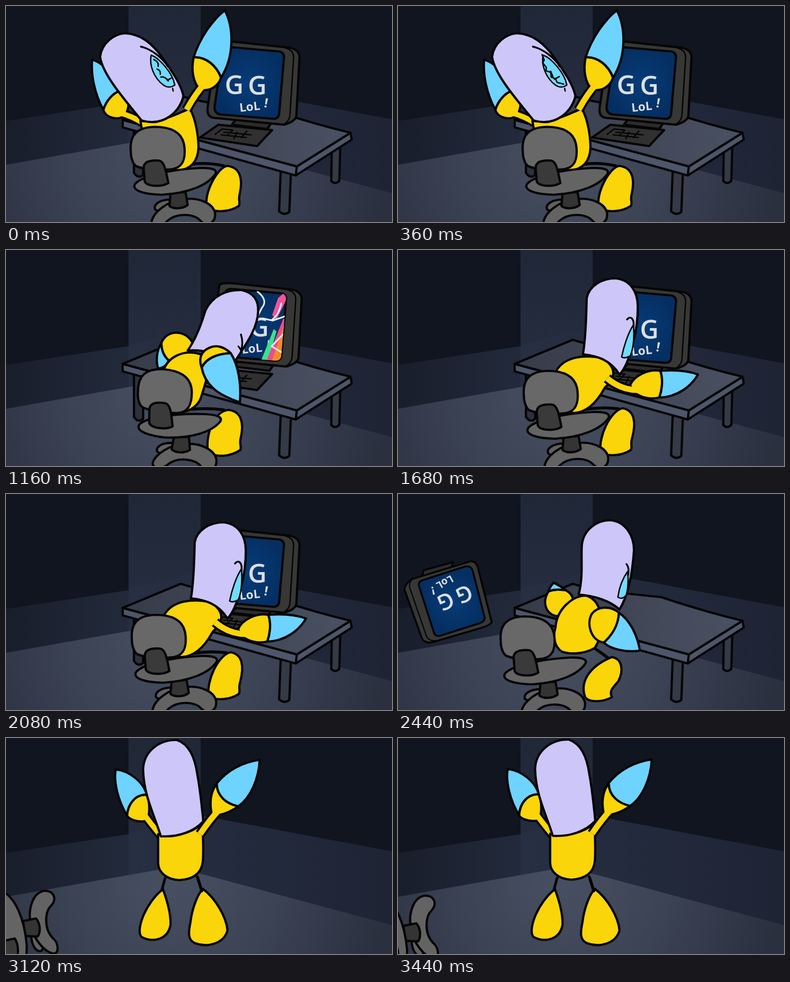
An HTML page for the animation above (3.48 s loop, 718 by 404 pixels).

```html
<!DOCTYPE html>
<html lang="en">
<head>
<meta charset="utf-8">
<title>Rage at the desk</title>
<style>
html, body { margin: 0; width: 100%; height: 100%; overflow: hidden; background: #11141d; }
svg { display: block; width: 100vw; height: 100vh; }
.ink { stroke: #050505; stroke-width: 4.2; stroke-linejoin: round; stroke-linecap: round; }
.line { fill: none; }
.thin { stroke-width: 2.6; }
text { fill: #dcdfe2; font-family: "Open Sans", sans-serif; }
</style>
</head>
<body>
<svg viewBox="0 0 718 404" preserveAspectRatio="none">
  <defs>
    <linearGradient id="pillar" x1="0" y1="0" x2="0" y2="1">
      <stop offset="0" stop-color="#202737"/><stop offset="1" stop-color="#273043"/>
    </linearGradient>
    <linearGradient id="wallL" x1="0" y1="0" x2="1" y2="0">
      <stop offset="0" stop-color="#191e2b"/><stop offset="1" stop-color="#252d3f"/>
    </linearGradient>
    <linearGradient id="wallR" x1="0" y1="0" x2="1" y2="0">
      <stop offset="0" stop-color="#272f43"/><stop offset="1" stop-color="#1e2434"/>
    </linearGradient>
    <radialGradient id="floor" gradientUnits="userSpaceOnUse" cx="310" cy="270" r="400">
      <stop offset="0" stop-color="#475062"/><stop offset=".5" stop-color="#3b4254"/><stop offset="1" stop-color="#2b303f"/>
    </radialGradient>
    <linearGradient id="top" x1="0" y1="0" x2="1" y2="0">
      <stop offset="0" stop-color="#363b49"/><stop offset="1" stop-color="#4a5162"/>
    </linearGradient>
    <radialGradient id="glow">
      <stop offset="0" stop-color="#063c78"/><stop offset="1" stop-color="#052f62"/>
    </radialGradient>
    <clipPath id="glass"><use href="#screen"/></clipPath>
  </defs>

  <rect width="718" height="404" fill="#11151f"/>
  <path d="M228 0H362V300H228Z" fill="url(#pillar)"/>
  <path d="M0 215L228 180L290 250L0 300Z" fill="url(#wallL)"/>
  <path d="M228 178L362 145L718 212V352L280 250L228 258Z" fill="url(#wallR)"/>
  <path d="M0 297L280 247L318 242L718 350V404H0Z" fill="url(#floor)"/>

  <g id="desk" class="ink">
    <path d="M238 230L238 312Q246 324 255 316L256 235Z" fill="#2d313b"/>
    <path d="M606 265L605 327Q612 335 620 327L622 255Z" fill="#343a46"/>
    <path d="M511 308L508 384Q518 393 527 385L530 312Z" fill="#343a46"/>
    <path d="M217 213L217 227L539 317L643 250L641 237L541 300Z" fill="#4d566a"/>
    <path d="M217 213L325 168Q350 176 385 182L490 193Q570 220 641 237L541 300Z" fill="url(#top)"/>
    <path class="line" d="M541 300L539 317"/>
  </g>

  <g id="keys" class="ink">
    <path d="M361 246L395 222L495 232L467 262Z" fill="#303030"/>
    <path class="line thin" d="M389 240L402 230L420 232M400 241L447 246M422 232L412 242M430 236L424 248M448 234L438 246M405 236L456 241"/>
  </g>

  <g id="monitor" class="ink">
    <path d="M428 212L420 222L486 230L492 221L482 214Z" fill="#2c2c2c"/>
    <path d="M393 69Q400 64 425 67L528 78Q546 82 546 96L540 206Q538 216 517 222L385 209Q373 206 375 190Z" fill="#373736"/>
    <path class="line thin" d="M518 78Q535 82 535 96L528 206Q526 216 517 221"/>
    <path id="screen" d="M403 86Q405 76 418 77L508 85Q518 87 517 97L508 202Q507 211 497 211L400 203Q387 201 388 188Z" fill="url(#glow)"/>
    <g stroke="none">
      <text x="407" y="165" font-size="48" font-weight="600">G</text>
      <text x="450" y="166" font-size="48" font-weight="600">G</text>
      <text transform="translate(435 198) rotate(-6)" font-size="22" font-weight="700">LoL</text>
      <text transform="translate(479 189) rotate(10)" font-size="24" font-weight="700">!</text>
    </g>
    <g id="crack" clip-path="url(#glass)" stroke="none">
      <path d="M491 126L502 94L520 78L516 100L499 134Z" fill="#f0559a"/>
      <path d="M470 212L494 152L499 156L484 212Z" fill="#3ee08c"/>
      <path d="M480 212L512 132L518 136L490 212Z" fill="#ee4b90"/>
      <path d="M490 212L518 130V212Z" fill="#f5892c"/>
      <path d="M464 82Q484 98 472 112L462 132M474 132L492 136L515 128M490 135Q504 126 508 104M511 162L490 184L513 198" fill="none" stroke="#e8eef5" stroke-width="3"/>
    </g>
  </g>

  <g id="upperBack">
    <path id="armLo" class="line" stroke="#050505" stroke-width="18"/>
    <path id="palmL" class="ink" fill="#fad50a"/>
    <path id="armLi" class="line" stroke="#fad50a" stroke-width="10"/>
    <path id="tipL" class="ink" fill="#6fd3ff"/>
  </g>
  <g id="legs" class="ink">
    <g id="leftLeg">
      <path class="line" stroke-width="5" d="M296 262Q292 276 288 292"/>
      <path d="M292 283C300 305 307 330 306 350C300 380 270 382 252 372C240 358 262 305 292 283Z" fill="#fad50a"/>
    </g>
    <path id="foot" fill="#fad50a"/>
    <path id="leg" class="line" style="stroke-width:5.5"/>
  </g>
  <g id="upper">
    <path id="body" class="ink" fill="#fad50a"/>
    <path id="head" class="ink" fill="#cdc7f9"/>
    <g id="face">
      <path id="eye" class="ink thin" fill="#6fdcff"/>
      <path id="brow" class="ink line" style="stroke-width:3.4"/>
      <g id="scowl" class="ink line thin">
        <path d="M310 154l1 5"/>
        <path id="wide" d="M275 100q10 5 8 13M281 118q7 2 6 10M288 133q7-2 14 7M300 139l7-4"/>
        <path id="jag" d="M268 91l4 10l-3 5l7 9l-1 6l9 3l1 9l8 3l3 7l12 3M284 122l4 10M291 137l9-5"/>
      </g>
    </g>
  </g>
  <g id="chair" class="ink">
    <path d="M306 362C288 362 274 370 277 380C283 386 300 382 312 378Z" fill="#606060"/>
    <path d="M271 402C275 385 300 366 325 362C360 356 386 370 389 388C390 408 372 412 362 402C350 388 318 386 300 402C292 412 270 414 271 402Z" fill="#636363"/>
    <path d="M306 350L334 348L338 372C328 380 312 380 304 374Z" fill="#343434"/>
    <path d="M240 333C250 320 300 306 360 303C386 302 394 307 389 315C375 335 340 350 290 353C250 352 234 343 240 333Z" fill="#646464"/>
    <path d="M232 270C230 240 245 227 276 226C312 226 330 240 332 265C334 288 328 302 310 305C285 308 255 306 241 299Q232 290 232 270Z" fill="#686868"/>
    <path d="M256 302C257 290 270 288 284 289C297 290 299 320 302 331C290 339 262 338 258 328Z" fill="#3a3a3a"/>
  </g>
  <g id="upperFront">
    <path id="armRo" class="line" stroke="#050505" stroke-width="19"/>
    <path id="palmR" class="ink" fill="#fad50a"/>
    <path id="armRi" class="line" stroke="#fad50a" stroke-width="11"/>
    <path id="tipR" class="ink" fill="#6fd3ff"/>
  </g>
</svg>
<script>
const LOOP = 3480;
const $ = id => document.getElementById(id);

// Five poses per part: arms raised, head slam, glare, grip, standing.
const parts = {
  head: [
    "M175 95C178 70 200 52 222 51C255 53 275 75 290 95C310 125 325 145 330 168C325 195 295 227 252 214C225 180 180 130 175 95Z",
    "M371 113C384 86 410 74 438 75C462 80 470 95 469 115C468 150 440 185 425 210C400 195 370 186 338 188C352 168 363 140 371 113Z",
    "M351 90C355 68 378 53 405 53C432 56 446 78 446 105C447 150 430 215 412 233C395 205 370 198 344 195C350 160 350 120 351 90Z",
    "M342 95C345 68 368 49 395 49C425 52 439 80 439 105C436 150 428 190 412 216C395 200 365 190 336 188C345 155 340 120 342 95Z",
    "M255 62C256 28 285 6 318 7C341 15 352 42 356 72C362 105 364 130 367 159C350 178 320 189 288 187C275 145 256 110 255 62Z"],
  body: [
    "M250 215C290 220 320 200 342 192C355 215 358 250 358 265C357 290 345 305 320 308C290 305 260 280 250 215Z",
    "M292 228C300 200 330 185 362 195C385 215 372 245 364 272C357 298 330 308 300 305C270 290 280 250 292 228Z",
    "M295 225C310 200 345 195 380 202C408 220 405 240 385 257C370 285 350 305 325 305C290 290 285 250 295 225Z",
    "M293 250C295 215 325 190 350 190C385 200 385 260 366 288C345 300 320 300 305 295C290 285 288 265 293 250Z",
    "M283 183C310 190 345 182 366 163C366 190 368 215 366 235C363 262 340 268 322 269C300 268 282 255 283 235Z"],
  palmL: [
    "M213 158C232 168 230 190 222 204C210 215 185 210 181 194C186 178 198 163 213 158Z",
    "M303 207C332 205 354 182 345 170C330 148 298 150 289 174C289 186 293 198 303 207Z",
    "M335 235C345 230 350 240 345 245C335 250 325 240 320 225C325 228 330 230 335 235Z",
    "M312 180C330 190 330 205 310 225C285 238 262 210 280 182C290 178 300 178 312 180Z",
    "M262 109C268 125 268 145 262 158C245 162 228 155 225 148C227 126 240 109 262 109Z"],
  tipL: [
    "M160 101C178 103 200 130 213 158C198 163 186 178 181 194C165 165 158 130 160 101Z",
    "M283 222C292 221 299 215 303 207C293 198 289 186 289 174C279 190 279 210 283 222Z",
    "M320 250C325 245 330 240 335 235C330 230 325 228 320 225C315 235 315 245 320 250Z",
    "M290 166C298 170 305 174 312 180C300 178 290 178 280 182C282 175 285 170 290 166Z",
    "M204 62C230 65 255 85 262 109C240 109 227 126 225 148C208 120 200 85 204 62Z"],
  armL: [
    "M212 200Q235 206 260 222", "M325 180Q325 181 325 182", "M335 240Q335 241 335 242",
    "M300 205Q300 206 300 207", "M256 145Q268 162 288 186"],
  palmR: [
    "M349 96C344 120 348 145 362 157C380 160 395 150 400 134C392 112 372 94 349 96Z",
    "M418 193C405 180 390 177 378 183C362 190 358 204 364 220C372 203 392 194 418 193Z",
    "M488 226C465 222 440 235 432 252C435 270 460 282 486 276C492 260 493 240 488 226Z",
    "M411 222C395 208 370 210 360 225C350 245 360 275 383 278C400 262 410 245 411 222Z",
    "M392 88C380 105 378 125 383 147C400 150 420 140 432 131C410 126 392 112 392 88Z"],
  tipR: [
    "M407 8C424 40 425 95 400 134C392 112 372 94 349 96C360 60 385 25 407 8Z",
    "M435 285C410 276 372 262 364 220C372 203 392 194 418 193C432 215 438 250 435 285Z",
    "M558 233C545 255 520 275 486 276C492 260 493 240 488 226C515 224 540 226 558 233Z",
    "M450 293C425 297 395 290 383 278C400 262 410 245 411 222C430 235 445 262 450 293Z",
    "M472 44C470 80 455 115 432 131C410 126 392 112 392 88C415 60 445 48 472 44Z"],
  armR: [
    "M369 146Q353 163 336 194", "M382 188Q382 189 382 190", "M446 262Q415 262 389 240",
    "M380 240Q380 241 380 242", "M396 138Q380 155 361 183"],
  eye: [
    "M270 92C285 97 310 125 314 148C308 152 300 153 293 148C275 135 266 110 270 92Z",
    "M432 180C434 183 436 186 438 189C438 188 437 187 437 186C436 184 434 182 432 180Z",
    "M438 140C440 160 438 185 432 198C425 202 420 203 416 200C420 180 428 155 438 140Z",
    "M427 145C429 158 428 180 424 190C418 196 414 196 409 193C412 170 420 155 427 145Z",
    "M350 100C350 101 350 102 350 103C350 102 350 101 350 100C350 100 350 100 350 100Z"],
  brow: [
    "M251 76C268 80 290 95 301 113", "M437 158C441 170 440 180 437 190", "M426 130C432 122 440 128 438 144",
    "M425 131C429 136 430 142 428 152", "M350 100C350 101 350 102 350 103"],
  foot: [
    "M412 299C435 302 441 322 435 350C431 364 437 368 433 374C415 386 390 386 374 379C366 350 395 300 412 299Z",
    "M414 299C437 302 443 322 437 350C433 364 439 368 436 374C417 387 392 388 376 379C370 350 385 302 414 299Z",
    "M418 296C440 300 443 322 436 350C431 364 437 368 433 374C415 386 390 386 377 379C372 350 395 300 418 296Z",
    "M398 305C417 308 420 330 410 350C400 362 392 368 398 380C380 390 355 390 348 380C336 345 365 318 398 305Z",
    "M366 282C390 300 410 335 412 360C405 385 375 392 352 384C338 378 339 365 343 345C346 320 355 295 366 282Z"],
  leg: [
    "M345 296Q375 292 405 299", "M345 298Q375 295 405 299", "M350 298Q380 293 410 297",
    "M365 288Q378 297 390 306", "M356 260Q360 272 364 286"]
};

// [time, pose]
const poses = [[0, 0], [960, 0], [1080, 1], [1360, 1], [1500, 2], [2160, 2], [2320, 3], [2600, 3], [2760, 4], [LOOP, 4]];

// [time, x, y, angle, scale]
const moves = {
  chair: [[0, 0, 0, 0, 1], [960, 0, 0, 0, 1], [1080, 8, 0, 5, 1], [1360, 8, 0, 5, 1], [1500, 2, 0, 0, 1], [2160, 2, 0, 0, 1],
    [2320, -41, 3, 0, 1], [2600, -41, 3, 0, 1], [2800, -281, 22, -92, 1], [2880, -284, 25, -92, 1], [3440, -322, 41, -92, 1], [LOOP, -322, 41, -92, 1]],
  desk: [[0, 0, 0, 0, 1], [2640, 0, 0, 0, 1], [2880, 99, -113, 60.5, 1.06], [3060, 350, -360, 85, 1.06], [LOOP, 350, -360, 85, 1.06]],
  monitor: [[0, 0, 0, 0, 1], [1060, 0, 0, 0, 1], [1100, 4, -4, 0, 1], [1360, 4, -4, 0, 1], [1440, 0, 0, 0, 1],
    [2180, 0, 0, 0, 1], [2440, -362, 58, -202, .86], [2600, -620, 130, -300, .86], [LOOP, -620, 130, -300, .86]],
  keys: [[0, 0, 0, 0, 1], [2180, 0, 0, 0, 1], [2400, -560, 40, -200, 1], [LOOP, -560, 40, -200, 1]]
};
const pivots = { chair: [315, 330], desk: [541, 300], monitor: [460, 144], keys: [428, 242] };

const lerp = (a, b, k) => a + (b - a) * k;
const smooth = k => k * k * (3 - 2 * k);

function span(keys, t) {
  let i = 0;
  while (i < keys.length - 2 && t >= keys[i + 1][0]) i++;
  const a = keys[i], b = keys[i + 1];
  return [a, b, Math.min(1, (t - a[0]) / (b[0] - a[0]))];
}

function mix(a, b, k) {
  if (a === b || k === 0) return a;
  const nums = b.match(/-?[\d.]+/g);
  let i = 0;
  return a.replace(/-?[\d.]+/g, n => lerp(+n, +nums[i++], k).toFixed(2));
}

function place(id, t) {
  const [a, b, k] = span(moves[id], t);
  const [x, y, r, s] = [1, 2, 3, 4].map(i => lerp(a[i], b[i], k));
  const [px, py] = pivots[id];
  $(id).setAttribute("transform", `translate(${px + x} ${py + y}) rotate(${r}) scale(${s}) translate(${-px} ${-py})`);
}

const show = (id, on) => $(id).setAttribute("visibility", on ? "visible" : "hidden");

function draw(t) {
  const [a, b, k] = span(poses, t);
  for (const name in parts) {
    const d = mix(parts[name][a[1]], parts[name][b[1]], smooth(k));
    const ids = name.startsWith("arm") ? [name + "o", name + "i"] : [name];
    ids.forEach(id => $(id).setAttribute("d", d));
  }
  Object.keys(moves).forEach(id => place(id, t));

  const bob = t < 2760 ? 0 : -2 + 2 * Math.cos((t - 2880) / 560 * 3 * Math.PI);
  ["upperBack", "upper", "upperFront"].forEach(id => $(id).setAttribute("transform", `translate(0 ${bob})`));

  show("crack", t >= 1080 && t < 1400);
  show("face", t < 2680);
  show("leftLeg", t >= 2660);
  show("wide", t < 200);
  show("jag", t >= 200 && t < 980);
  show("scowl", t < 980);
}

function tick(now) {
  draw(now % LOOP);
  requestAnimationFrame(tick);
}
draw(0);
requestAnimationFrame(tick);
</script>
</body>
</html>
```
